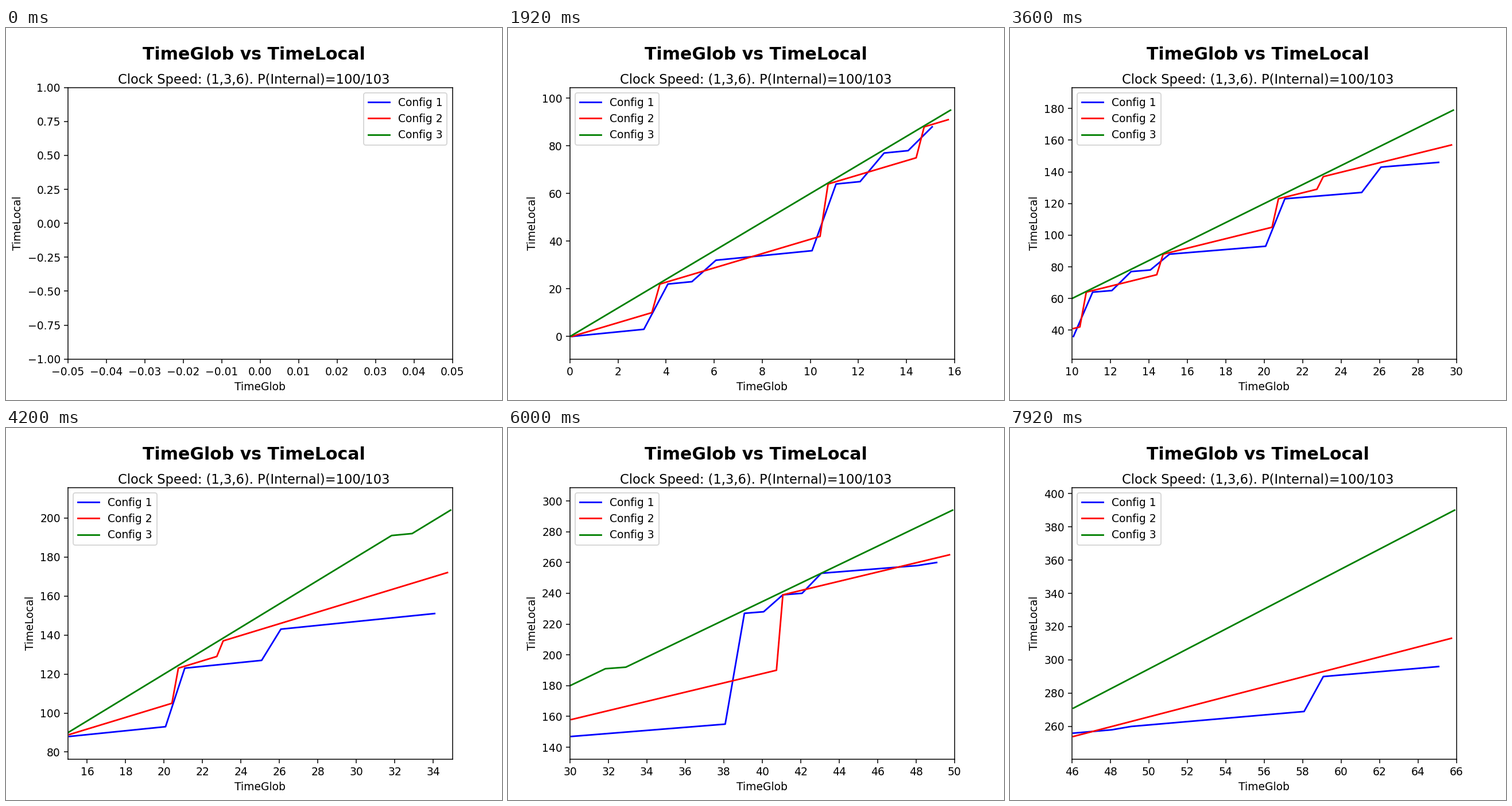
Animation of 864x648 px, one loop 8 s. Source, as a matplotlib script:

```python
import numpy as np
import matplotlib.pyplot as plt
from matplotlib.animation import FuncAnimation

plt.rcParams["font.family"] = "DejaVu Sans"

SPAN = 20        # seconds of history kept in view
STEP_MS = 120    # time between plot updates
TICK_MS = 40
LOOP_MS = 8000
END = 67         # seconds simulated


def clock(rate, start, inbox=()):
    """Logical clock: +1 per tick, moved past the stamp of any message received."""
    times = start + np.arange(END * rate) / rate
    stamps = {np.searchsorted(times, arrival): stamp for arrival, stamp in inbox}
    values = np.zeros(len(times))
    for n in range(1, len(times)):
        values[n] = max(values[n - 1], stamps.get(n, 0)) + 1
    return times, values


def send(sender, stamps, delay):
    """Messages sent when the sender's clock shows each stamp."""
    times, values = sender
    return [(times[np.searchsorted(values, s)] + delay, s) for s in stamps]


fast = clock(6, 0.005)
fast[0][192:] += 0.9    # one pause
to_all = [21, 63, 87, 122, 238]
mid = clock(3, 0.075, send(fast, to_all + [136], 0.2))
slow = clock(1, 0.075, send(fast, to_all + [31, 76, 226, 252], 0)
             + send(mid, [142, 259, 289], 0.5))
clocks = [slow, mid, fast]

fig, ax = plt.subplots(figsize=(6.4, 4.8), dpi=135)
fig.subplots_adjust(left=0.125, right=0.9, bottom=0.11, top=0.84)
fig.suptitle("TimeGlob vs TimeLocal", fontsize=16, fontweight="bold", y=0.95)
fig.text(0.5, 0.85, "Clock Speed: (1,3,6). P(Internal)=100/103",
         fontsize=12, ha="center")
ax.set_xlabel("TimeGlob")
ax.set_ylabel("TimeLocal")
ax.locator_params(axis="x", nbins=10)
lines = [ax.plot([], [], color=c, label=f"Config {i}")[0]
         for i, c in enumerate(("blue", "red", "green"), 1)]
ax.legend(loc="best")


def update(frame):
    now = frame * TICK_MS // STEP_MS
    left = max(0, now - SPAN)
    shown = []
    for line, (t, v) in zip(lines, clocks):
        keep = (t >= left) & (t < now)
        line.set_data(t[keep], v[keep])
        shown.append(v[keep])
    if now == 0:
        ax.set_xlim(-0.05, 0.05)
        ax.set_ylim(-1, 1)
    else:
        shown = np.concatenate(shown)
        low, high = shown.min(), shown.max()
        pad = 0.1 * (high - low)
        ax.set_xlim(left, now)
        ax.set_ylim(low - pad, high + pad)
    return lines


anim = FuncAnimation(fig, update, frames=LOOP_MS // TICK_MS, interval=TICK_MS,
                     init_func=lambda: update(0), repeat=True, repeat_delay=0,
                     blit=False)
plt.show()
```
